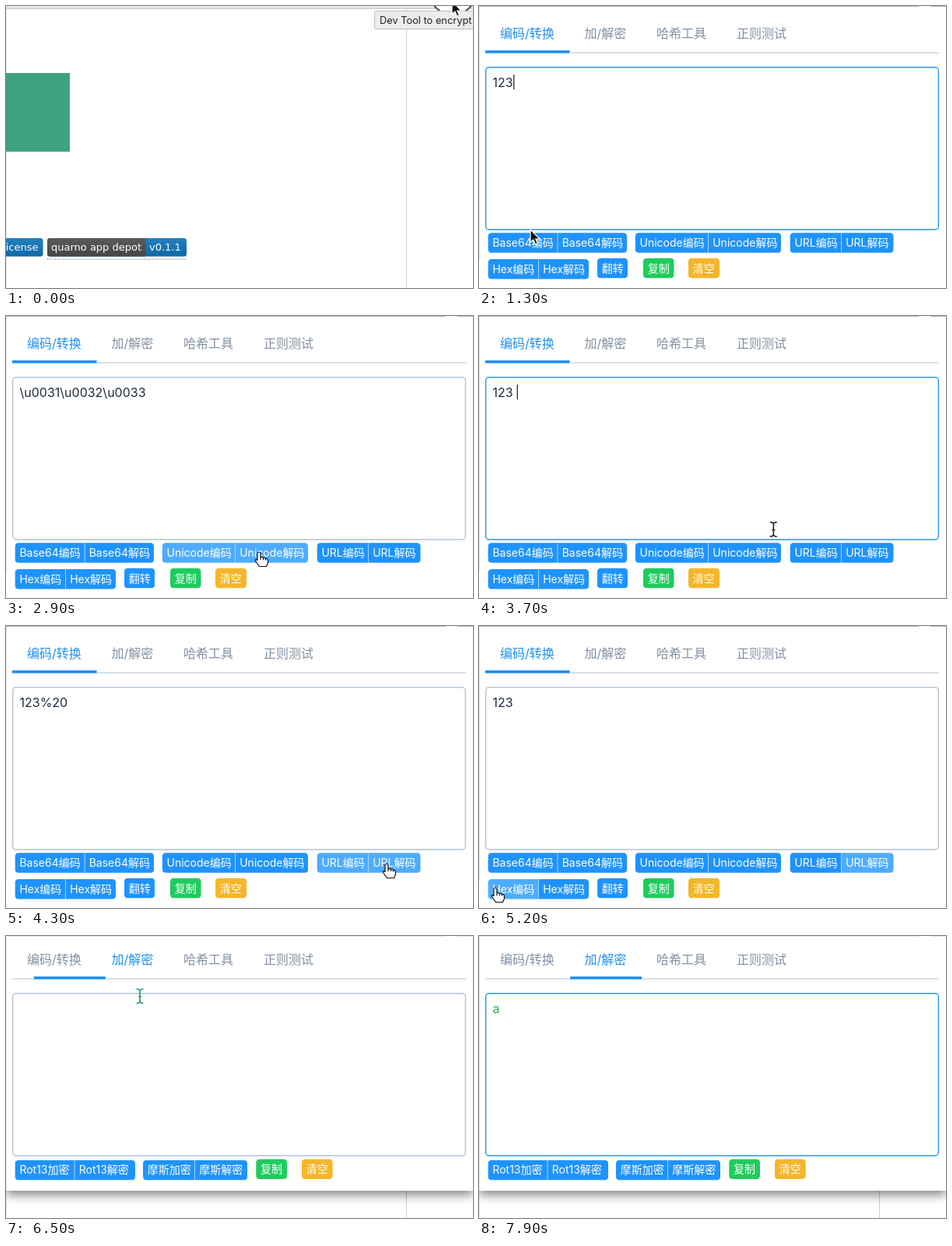
An HTML page for the animation above (8 s loop, 600 by 362 pixels).

```html
<!DOCTYPE html>
<html lang="zh">
<head>
<meta charset="utf-8">
<style>
  html, body { margin: 0; width: 100%; height: 100%; overflow: hidden; background: #fff; }
  svg { display: block; width: 600px; height: 362px; }
  text { font-family: Inter, "Noto Sans CJK SC", "Noto Sans CJK", sans-serif; white-space: pre; }
  .badge { font: 13px "DejaVu Sans", sans-serif; fill: #fff; }
</style>
</head>
<body>
<svg id="stage" viewBox="0 0 600 362" xmlns="http://www.w3.org/2000/svg">
  <defs>
    <filter id="shadow" x="-10%" y="-10%" width="120%" height="125%">
      <feDropShadow dx="0" dy="5" stdDeviation="7" flood-color="#000" flood-opacity=".5"/>
    </filter>
    <linearGradient id="gloss" x2="0" y2="1">
      <stop stop-color="#fff" stop-opacity=".08"/><stop offset="1" stop-opacity=".1"/>
    </linearGradient>
  </defs>

  <g id="page">
    <rect width="600" height="362" fill="#fff"/>
    <path d="M.5 4V362" stroke="#e2e2e2"/>
    <path d="M514.5 4V362" stroke="#ccc"/>
    <rect width="600" height="3" fill="#ededed"/>
    <path d="M0 3H600" stroke="#c4c4c4" stroke-width="1.5"/>
    <rect x="-19" y="86" width="101" height="101" fill="#3fa27e"/>
    <rect x="-20" y="298" width="67.5" height="23.5" rx="3.5" fill="#0f73b8"/>
    <rect x="53" y="298" width="179" height="23.5" rx="3.5" fill="#0f73b8"/>
    <path d="M56.500 298H179.500V321.500H56.500Q53 321.500 53 318V301.500Q53 298 56.500 298Z" fill="#4c4c4c"/>
    <rect x="-20" y="298" width="67.5" height="23.5" rx="3.5" fill="url(#gloss)"/>
    <rect x="53" y="298" width="179" height="23.5" rx="3.5" fill="url(#gloss)"/>
    <text class="badge" x="41.500" y="314" text-anchor="end">License</text>
    <text class="badge" x="58" y="314">quarno app depot</text>
    <text class="badge" x="184" y="314">v0.1.1</text>
    <path d="M53 325H232" stroke="#555" stroke-dasharray="1 1.5"/>
    <g id="tooltip">
      <circle cx="574" cy="-18" r="29.500" fill="#fff" stroke="#444" stroke-width="2"/>
      <rect x="473.500" y="6.500" width="140" height="23" rx="2" fill="#ececec" stroke="#bdbdbd"/>
      <text x="480" y="22.500" font-size="12.800" fill="#222">Dev Tool to encrypt</text>
    </g>
  </g>

  <g id="popup">
    <rect id="sheet" x="0" y="-20" width="600" fill="#fff" filter="url(#shadow)"/>
    <path id="leftEdge" d="M.5 0V327" stroke="#e4e4e4"/>
    <path id="topEdge" d="M0 .5H565M580 .5H600" stroke="#b4b4b4"/>
    <g id="content">
      <path d="M8 60H591" stroke="#cfd6de" stroke-width="1.500"/>
      <rect id="bar" y="57" height="3.500" fill="#2090f2"/>
      <g id="tabs" font-size="16"></g>
      <rect id="area" x="8.700" y="78.700" width="581.600" height="208.300" rx="4" fill="#fff" stroke-width="1.400"/>
      <text id="value" x="17.500" y="104" font-size="16"></text>
      <rect id="caret" y="88" width="1.300" height="19" fill="#1f2d3d"/>
      <g id="encodePanel"></g>
      <g id="cipherPanel"></g>
    </g>
  </g>

  <g id="pointer">
    <path id="arrow" d="M0 0V16.500L3.800 13L6.500 19L9.300 17.800L6.700 12H12Z" fill="#111" stroke="#fff" stroke-width="1.200"/>
    <path id="hand" d="M-2 1.500Q0-1.500 2 1.500V7Q4 5.500 5.500 7.500Q7.500 6.500 8.500 8.500Q11.500 8 11.500 11V14L9.500 18.500H.5L-4.500 11.500Q-5.500 8.500-2 10.500ZM2 7V10M5.500 7.500V10M8.500 8.500V10.500" fill="#fff" stroke="#111" stroke-width="1.200" stroke-linejoin="round"/>
    <path id="beam" d="M-4.500-9Q0-9 0-6Q0-9 4.500-9M0-6V6M-4.500 9.500Q0 9.500 0 6Q0 9.500 4.500 9.500M-2 1H2" fill="none" stroke-width="1.700"/>
  </g>
</svg>

<script>
const LOOP = 8000, STEP = 100, OPEN_AT = 400, SWITCH_AT = 6400;
const BLUE = '#1f93fd', LIGHT = '#4eacff', GREEN = '#20cb5e', AMBER = '#f4b62a';
const $ = id => document.getElementById(id);
const show = (node, on) => node.setAttribute('display', on ? 'inline' : 'none');

function add(parent, tag, attrs, text) {
  const node = document.createElementNS('http://www.w3.org/2000/svg', tag);
  for (const key in attrs) node.setAttribute(key, attrs[key]);
  if (text) node.textContent = text;
  parent.appendChild(node);
  return node;
}

const buttons = [];

function addButton(panel, id, x, y, w, label, color = BLUE, corners = 'both') {
  const r = 4.5, left = corners !== 'right' ? r : 0, right = corners !== 'left' ? r : 0, h = 25.5;
  const d = `M${x + left} ${y}H${x + w - right}q${right} 0 ${right} ${right}V${y + h - right}` +
    `q0 ${right} ${-right} ${right}H${x + left}q${-left} 0 ${-left} ${-left}V${y + left}q0 ${-left} ${left} ${-left}Z`;
  const shape = add(panel, 'path', { d, fill: color });
  add(panel, 'text', { x: x + 5.7, y: y + 17.7, 'font-size': 14, fill: '#fff' }, label);
  buttons.push({ panel, id, x, y, w, h, color, shape });
}

function addPair(panel, id, x, y, split, end, name, verbs) {
  addButton(panel, id + '+', x, y, split - x, name + verbs[0], BLUE, 'left');
  addButton(panel, id + '-', split, y, end - split, name + verbs[1], BLUE, 'right');
  add(panel, 'path', { d: `M${split} ${y}v25.5`, stroke: '#a5d3ff' });
}

const encode = $('encodePanel'), cipher = $('cipherPanel');
const codeVerbs = ['编码', '解码'], cipherVerbs = ['加密', '解密'];
addPair(encode, 'base64', 11.7, 291.3, 101, 190, 'Base64', codeVerbs);
addPair(encode, 'unicode', 200.8, 291.3, 294.5, 388, 'Unicode', codeVerbs);
addPair(encode, 'url', 399.7, 291.3, 465.5, 532.5, 'URL', codeVerbs);
addPair(encode, 'hex', 11.7, 325, 76.5, 141, 'Hex', codeVerbs);
addButton(encode, 'flip', 152, 323.8, 39, '翻转');
addButton(encode, 'copy', 211, 323.8, 39.5, '复制', GREEN);
addButton(encode, 'clear', 269, 323.8, 40, '清空', AMBER);
addPair(cipher, 'rot', 11.7, 292.7, 88, 166, 'Rot13', cipherVerbs);
addPair(cipher, 'morse', 176, 292.7, 242.5, 310, '摩斯', cipherVerbs);
addButton(cipher, 'copy2', 321.3, 291.6, 39.7, '复制', GREEN);
addButton(cipher, 'clear2', 380, 291.6, 39.7, '清空', AMBER);

const tabs = [[27, '编码/转换'], [135.5, '加/解密'], [228, '哈希工具'], [331, '正则测试']]
  .map(([x, label]) => add($('tabs'), 'text', { x, y: 41 }, label));

// time, field value, focused element
const edits = [
  [0, '', 'field'], [700, '1', 'field'], [800, '12', 'field'], [900, '123', 'field'],
  [1600, 'MTIz', 'base64+'], [2000, '123', 'base64-'],
  [2500, '\\u0031\\u0032\\u0033', 'unicode+'], [3000, '123', 'unicode-'],
  [3300, '123', 'field'], [3500, '123 ', 'field'],
  [3900, '123%20', 'url+'], [4500, '123 ', 'url-'],
  [5300, '31323320', 'hex+'], [5700, '123 ', 'hex-'],
  [SWITCH_AT, '', 'tab'], [7000, '', 'field'], [7300, 'a', 'field']
];

// time, x, y of the pointer hotspot
const path = [
  [0, 573, -6], [1000, 573, -6], [1300, 66, 287], [1400, 62, 302], [1600, 62, 302],
  [1800, 146, 303], [2000, 146, 303], [2300, 248, 303], [2500, 248, 303],
  [2800, 325, 303], [3000, 325, 303], [3200, 70, 99], [3500, 70, 99],
  [3800, 432, 304], [3900, 432, 304], [4200, 489, 305], [4500, 489, 305],
  [5000, 21, 336], [5300, 21, 336], [5500, 106, 338], [5700, 106, 338],
  [6100, 166, 38], [6400, 166, 38], [6500, 172, 77], [6800, 150, 130], [LOOP, 150, 130]
];

const inOut = p => p < .5 ? 4 * p ** 3 : 1 - (2 - 2 * p) ** 3 / 2;
const clamp = p => Math.max(0, Math.min(1, p));

function pointerAt(t) {
  const i = path.findIndex(p => p[0] > t);
  const [t0, x0, y0] = path[i - 1], [t1, x1, y1] = path[i];
  const k = inOut((t - t0) / (t1 - t0));
  return [x0 + (x1 - x0) * k, y0 + (y1 - y0) * k];
}

function drawPopup(t, second, x, y) {
  const lift = second ? 5 : 0;
  const [editedAt, value, focus] = edits.filter(e => e[0] <= t).pop();
  const focused = focus === 'field';
  $('sheet').setAttribute('height', second ? 347 : 420);
  $('topEdge').setAttribute('stroke', second ? '#e6e6e6' : '#b4b4b4');
  $('content').setAttribute('transform', `translate(0 ${-lift})`);
  show(encode, !second);
  show(cipher, second);

  const slide = second ? inOut(clamp((t - SWITCH_AT + 20) / 300)) : 0;
  $('bar').setAttribute('x', 8 + 109 * slide);
  $('bar').setAttribute('width', second ? 92 : 108.5);
  tabs.forEach((tab, i) => tab.setAttribute('fill', i === +second ? '#2090f2' : '#8290a2'));

  $('area').setAttribute('stroke', focused ? '#2b94f3' : '#b5c3d5');
  $('value').textContent = value;
  $('value').setAttribute('fill', second ? '#20b457' : '#1f2d3d');
  show($('caret'), focused && (t - editedAt) % 1000 < 500);
  $('caret').setAttribute('x', 18 + (value ? $('value').getComputedTextLength() : 0));

  const panel = second ? cipher : encode;
  let hovered = null;
  for (const b of buttons) {
    const over = b.panel === panel && x >= b.x && x < b.x + b.w && y + lift >= b.y && y + lift < b.y + b.h;
    if (over) hovered = b;
    b.shape.setAttribute('fill', b.color === BLUE && (over || focus === b.id) ? LIGHT : b.color);
  }
  return hovered;
}

function draw(time) {
  const t = Math.floor((time % LOOP) / STEP) * STEP;
  const open = t >= OPEN_AT, second = t >= SWITCH_AT;
  const [x, y] = pointerAt(t);
  show($('popup'), open);
  show($('tooltip'), !open);
  const hovered = open && drawPopup(t, second, x, y);

  const overTab = open && y > 18 && y < 55 && x < 410;
  const overField = open && y > (second ? 73 : 78) && y < 283 && x > 8 && x < 591;
  const kind = hovered || overTab ? 'hand' : overField ? 'beam' : 'arrow';
  for (const id of ['hand', 'beam', 'arrow']) show($(id), id === kind);
  $('beam').setAttribute('stroke', second ? '#22a868' : '#333');
  $('pointer').setAttribute('transform', `translate(${x} ${y})`);
  show($('pointer'), t < 700 || t >= 1000 && t < 7300);
}

const start = performance.now();
function tick() {
  draw(performance.now() - start);
  requestAnimationFrame(tick);
}
tick();
</script>
</body>
</html>
```
